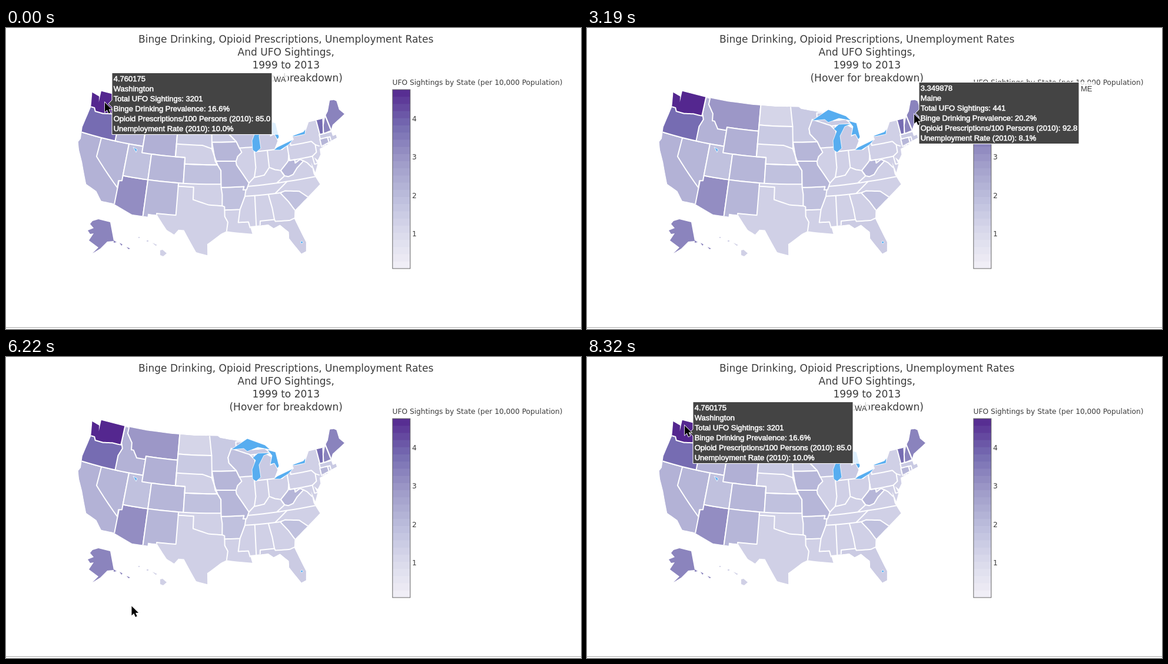
Animation, 977 px wide and 513 px high, one loop 10000 ms. Source, as an HTML page:

```html
<!DOCTYPE html>
<html lang="en">
<head>
<meta charset="utf-8">
<title>UFO Sightings by State</title>
<style>
html, body { margin: 0; width: 100%; height: 100%; overflow: hidden; background: #fff; }
svg { display: block; width: 100%; height: 100%; }
text { font: 12.2px "DejaVu Sans", sans-serif; fill: #3c3c3c; white-space: pre; }
.title { font-size: 17.05px; text-anchor: middle; }
.tip text { font: 13px "Liberation Sans", Arial, sans-serif; }
.tip .row { fill: #fff; stroke: #fff; stroke-width: .55px; }
#states { stroke: #fff; stroke-width: 2; stroke-linejoin: round; }
#lakes { fill: #57adf0; stroke: #fff; stroke-width: .8; }
#cursor { stroke: #fff; stroke-width: 1.6; paint-order: stroke; }
</style>
</head>
<body>
<svg id="stage" viewBox="0 0 977 513" xmlns="http://www.w3.org/2000/svg">
  <clipPath id="nation"></clipPath>
  <g clip-path="url(#nation)"><g id="states"></g></g>
  <g id="alaska">
    <path d="M157 326L177 331 183 363 172 364 160 376 147 384 157 374 141 362 149 350 143 351 139 345 149 341 143 334 147 329Z"/>
    <path d="M183 362L188 365 183 366ZM193 366L198 369 196 371ZM205 373L211 376 208 377Z"/>
  </g>
  <path id="hawaii" d="M262 379L266 378 273 384 267 389 262 387ZM225 356h2v2h-2ZM239 362h3v2h-3ZM249 366l8 4-3 1Z"/>
  <g id="lakes">
    <path d="M382 158L410 139 440 150 449 158 428 154 410 161 404 156Z"/>
    <path d="M419 172L428 164 450 163 438 168 430 184 433 205 425 212 419 208 418 192 424 176Z"/>
    <path d="M444 158L458 162 464 186 461 190 456 181 449 183 452 168Z"/>
    <path d="M455 208L461 203 488 190 480 199 466 208Z"/>
    <path d="M486 184L505 177 509 172 508 181 489 185Z"/>
    <path d="M216 203L223 207 221 212Z"/>
    <circle cx="502.6" cy="365.3" r="2"/>
  </g>
  <g id="bar"></g>
  <rect x="656.8" y="105" width="30" height="305" fill="none" stroke="#666"/>
  <text x="656.5" y="97">UFO Sightings by State (per 10,000 Population)</text>
  <g id="ticks"></g>
  <text class="title" x="475.7" y="25">Binge Drinking, Opioid Prescriptions, Unemployment Rates</text>
  <text class="title" x="475.7" y="47">And UFO Sightings,</text>
  <text class="title" x="475.7" y="69">1999 to 2013</text>
  <text class="title" x="475.7" y="91">(Hover for breakdown)</text>
  <path d="M0 510.5H977" stroke="#aaa"/>
  <g id="tips"></g>
  <path id="cursor" d="M0 0V16L3.8 12.6 6.4 18.6 9.2 17.4 6.6 11.6H11.6Z"/>
</svg>
<script>
const $ = id => document.getElementById(id);

function add(parent, tag, attrs, text) {
  const el = document.createElementNS('http://www.w3.org/2000/svg', tag);
  for (const key in attrs) el.setAttribute(key, attrs[key]);
  if (text) el.textContent = text;
  return parent.appendChild(el);
}

// Colour scale for sightings per 10,000 people
const LOW = .1, HIGH = 4.76;
const RAMP = ['#f2f0f7', '#dadaeb', '#bcbddc', '#9e9ac8', '#756bb1', '#54278f'];

function shade(rate) {
  const pos = (rate - LOW) / (HIGH - LOW) * 5;
  const i = Math.min(4, Math.floor(pos));
  return `color-mix(in srgb, ${RAMP[i + 1]} ${(pos - i) * 100}%, ${RAMP[i]})`;
}

// Albers equal-area conic; longitudes are degrees west
const RAD = Math.PI / 180, SCALE = 626;
const S1 = Math.sin(29.5 * RAD), S2 = Math.sin(45.5 * RAD);
const N = (S1 + S2) / 2, C = 1 - S1 * S1 + 2 * N * S1;

function project(west, lat) {
  const rho = SCALE * Math.sqrt(C - 2 * N * Math.sin(lat * RAD)) / N;
  const angle = N * (96 - west) * RAD;
  return [353.6 + rho * Math.sin(angle), rho * Math.cos(angle) - 555];
}

// Edges are subdivided so that parallels bend with the projection
function trace(text) {
  const stops = text.split(',').map(p => p.split(' ').map(Number));
  return stops.flatMap(([w, l], i) => {
    const [w2, l2] = stops[i + 1] || [w, l];
    return [0, .2, .4, .6, .8, 1].map(k => project(w + (w2 - w) * k, l + (l2 - l) * k));
  }).join(' ');
}

// Regions overlap: later ones cover earlier ones, and the coast clips them all
const area = (rate, text) =>
  add($('states'), 'polygon', { fill: shade(rate), points: trace(text + ',' + text.split(',')[0]) });
const box = (rate, w, n, e, s) => area(rate, `${w} ${n},${e} ${n},${e} ${s},${w} ${s}`);
const border = text => add($('states'), 'polyline', { fill: 'none', points: trace(text) });

const north = '124.7 48.4,122.9 48.1,122.6 47.2,122.76 49,95.15 49,94.6 48.7,89.6 48,92.1 46.75,88 47.4,87.4 46.5,84.6 46.5,83.9 46,84.7 45.75,83.4 45.1,83.9 43.8,82.9 44.05,82.4 43,83.4 41.7,81.7 41.5,78.9 42.85,79.05 43.27,77 43.27,76.2 43.6,75 45,71.5 45,70.3 45.9,69.2 47.45,68.3 47.35,67.8 47.07,67.8 45.7';
const atlantic = '66.97 44.8,70.1 43.7,70.8 42.87,70.7 42,70 42.05,70 41.6,73.6 41,72 41,74 40.6,74.1 39.7,74.9 38.95,75.5 39.5,75.1 38.4,75.9 37.2,76.3 38.9,76.3 37,75.5 35.25,77.9 33.9,79.3 33.1,81.1 32,81.4 30.7,80.03 26.8,80.3 25.4';
const gulf = '81.1 25.15,82.8 27.8,82.7 28.8,84.1 30.1,85.3 29.7,86.2 30.35,89.5 30.3,89.2 29.1,93.8 29.7,94.8 29.3,97.2 27.7,97.15 25.95,99.1 26.4,101.4 29.77,102.4 29.77,103.1 28.98,104.5 29.6,106.5 31.78,108.2 31.78,108.2 31.33,111.07 31.33,114.8 32.5';
const pacific = '117.1 32.5,118.4 33.8,120.6 34.5,122.5 37.6,123.8 39.3,124.4 40.4,124.1 41,124.5 42.8,124 46.2';
add($('nation'), 'polygon', { points: trace([north, atlantic, gulf, pacific].join()) });

box(1.35, 130, 50, 60, 24);
box(2.25, 126, 42, 114, 32);
box(3.15, 114.6, 37, 109.05, 31);
area(2.15, '120 42,114.04 42,114.04 36.2,114.7 36.1,114.63 35,120 39');
box(3.8, 126, 47, 116, 42);
area(2.25, '117 49,111 49,111.05 42,117.03 42,117.1 44.3,116.5 45.5,117 46.4');
area(4.76, '126 49.5,117.03 49.5,117 46,119 46,121 45.7,122.8 45.7,123.2 46.2,126 46.2');
area(2.95, '116.05 50,104.05 50,104.05 45,111.05 45,111.05 44.5,113 44.5,114 45.6,114.5 45.6,114.7 46.7,116.05 48');
box(1.85, 114.04, 42, 109.05, 37);
box(2.3, 111.05, 45, 104.05, 41);
box(2.15, 109.05, 41, 102.05, 37);
area(2.15, '109.05 37,103 37,103.05 32,106.6 32,106.5 31,109.05 31');
area(1.55, '98 50,89 50,89 47,92.1 46.75,92.9 45.6,92.75 44.75,91.2 43.5,97 43.5');
area(1.2, '104.05 50,97.2 50,96.55 45.95,104.05 45.95');
area(1.55, '104.05 45.95,96.55 45.95,96.45 42.5,98.5 43,104.05 43');
box(1.85, 102.05, 40, 94.62, 37);
area(2.15, '96.45 43.5,91.2 43.5,90.2 41.8,91.1 41.2,91.5 40.4,95.77 40.58');
area(1.85, '94.62 36.5,89.7 36.5,90.1 35,91.17 33,94.04 33,94.04 33.5,94.48 33.65,94.43 35.4');
area(2.15, '95.77 40.58,91.5 40.5,91.4 39.9,90.2 38.4,89.15 37,89.7 36,90.37 36,90.15 36.5,94.62 36.5,94.62 39.1');
box(1.55, 91, 48, 83.5, 45.8);
area(1.55, '87.3 41.75,83 41.75,82 43,82 45.8,87 45.8');
area(1.85, '92.1 47,90.4 46.55,88.1 45.9,87 45,87.3 42.5,90.65 42.5,91.2 43.5,92.75 44.75,92.9 45.6');
area(2.15, '82 37.5,82.6 38.4,80.8 39.7,80.52 40.6,80.52 39.72,79.48 39.72,79.48 39.2,78.4 39.6,77.75 39.3,79.3 38.4,80.3 37.5,81.3 37.3');
area(1.85, '83.3 35,82.3 35.2,79.67 34.8,78 33.5,80.5 31.5,81.1 32.1,82 33.5');
area(1.5, '87.6 31,85 31,84.86 30.7,82.2 30.57,81.3 30.8,79 28,80 24,88 28');
box(1.55, 73.4, 42.75, 69, 41);
box(2.15, 73.5, 42.05, 71.8, 40.9);
box(1.85, 71.8, 42.02, 71.3, 41);
area(3.8, '73.35 46,71.5 46,72.45 42.73,73.27 42.75');
area(3.33, '71.5 45,71.08 45.3,70.7 42.87,72.45 42.73,72.1 44');
area(3.35, '71.08 45.3,70 48,66 48,66 43,70.7 43');

border('104.05 43,104.05 41,102.05 41,102.05 40,95.3 40,96.5 42.5');
border('103 37,103 36.5,100 36.5,100 34.56,97 33.8,94.48 33.65');
border('94.04 33,94.04 32,93.5 31.1,93.8 29.5');
border('91.17 33,91.6 31,89.75 31,89.5 30');
border('88.2 35,88.4 30');
border('85.6 35,85.15 32.8,85 31');
border('90.1 35,83.1 35');
border('89.5 36.5,81.68 36.59,75.5 36.55');
border('81.68 36.59,84.3 35');
border('89.15 37,88.05 37.8,86 38,84.82 39.1,83.7 38.65,82.6 38.4,82 37.5,83.68 36.6');
border('88 37.8,87.53 39.3,87.53 41.8');
border('84.82 39.1,84.8 41.7');
border('80.52 42.2,80.52 39.72,75.79 39.72,75.7 38.46,75 38.45');
border('79.76 42.4,79.76 42,75.35 42,74.7 41.36,74.8 40.2,75.79 39.72');
border('74.7 41.36,73.9 41');
border('77.75 39.3,77.1 38.9,76.3 38');
$('alaska').style.fill = shade(3.33);
$('hawaii').style.fill = shade(1.35);

const barY = rate => 410 - (rate - LOW) / (HIGH - LOW) * 305;
const BANDS = 25, bandHeight = 305 / BANDS;
for (let i = 0; i < BANDS; i++) {
  const fill = shade(LOW + (HIGH - LOW) * (i + .5) / BANDS);
  add($('bar'), 'rect', { x: 657, y: 105, width: 30, height: 305 - i * bandHeight, fill });
}
for (let rate = 1; rate <= 4; rate++) add($('ticks'), 'text', { x: 690, y: barY(rate) + 4 }, rate);

function tip(x, y, code, [rate, name, total, binge, opioid, jobless]) {
  const g = add($('tips'), 'g', { class: 'tip', transform: `translate(${x} ${y})` });
  const rows = [rate, name, `Total UFO Sightings: ${total}`, `Binge Drinking Prevalence: ${binge}%`,
    `Opioid Prescriptions/100 Persons (2010): ${opioid}`, `Unemployment Rate (2010): ${jobless}%`];
  add(g, 'rect', { x: 278, y: -53, width: 27, height: 106, fill: '#fff', 'fill-opacity': .8 });
  add(g, 'path', { d: 'M0 0L6 6V52.5H278V-52.5H6V-6Z', fill: '#444', stroke: '#fff' });
  rows.forEach((row, i) => add(g, 'text', { class: 'row', x: 8.7, y: -37.7 + 16.85 * i }, row));
  add(g, 'text', { x: 281, y: -37.5 }, code);
  return g;
}
const washington = tip(174, 129, 'WA', ['4.760175', 'Washington', 3201, 16.6, '85.0', '10.0']);
const maine = tip(558, 145, 'ME', ['3.349878', 'Maine', 441, 20.2, 92.8, 8.1]);
const florida = tip(484, 349.5, 'FL', ['1.66927', 'Florida', 3139, 17.2, 87.6, 11.1]);

// Each move bends from wherever the previous one ended
const moves = [
  { start: 0, end: 1, bend: [168, 127], to: [168, 127] },
  { start: 480, end: 1480, bend: [360, 40], to: [558, 112] },
  { start: 1530, end: 1770, bend: [558, 119], to: [556, 126] },
  { start: 1770, end: 1990, bend: [556, 136], to: [556, 147] },
  { start: 3190, end: 4170, bend: [590, 260], to: [501, 352] },
  { start: 4230, end: 4400, bend: [496, 356], to: [491, 360] },
  { start: 5600, end: 6570, bend: [300, 500], to: [99, 374] },
  { start: 6630, end: 7160, bend: [30, 290], to: [83, 207] },
  { start: 7460, end: 8320, bend: [115, 150], to: [166, 117] }
];

function cursorAt(t) {
  const i = moves.findLastIndex(m => t >= m.start);
  const { start, end, bend, to } = moves[i];
  const from = moves[Math.max(0, i - 1)].to;
  const k = (1 - Math.cos(Math.PI * Math.min(1, (t - start) / (end - start)))) / 2, r = 1 - k;
  return from.map((v, axis) => r * r * v + 2 * r * k * bend[axis] + k * k * to[axis]);
}

const show = (el, on) => el.setAttribute('visibility', on ? 'visible' : 'hidden');

function draw() {
  const t = performance.now() % 10000;
  show(washington, t < 600 || t >= 8050);
  show(maine, t >= 1830 && t < 3360);
  show(florida, t >= 4230 && t < 5720);
  $('cursor').setAttribute('transform', `translate(${cursorAt(t)})`);
  requestAnimationFrame(draw);
}
draw();
</script>
</body>
</html>
```
